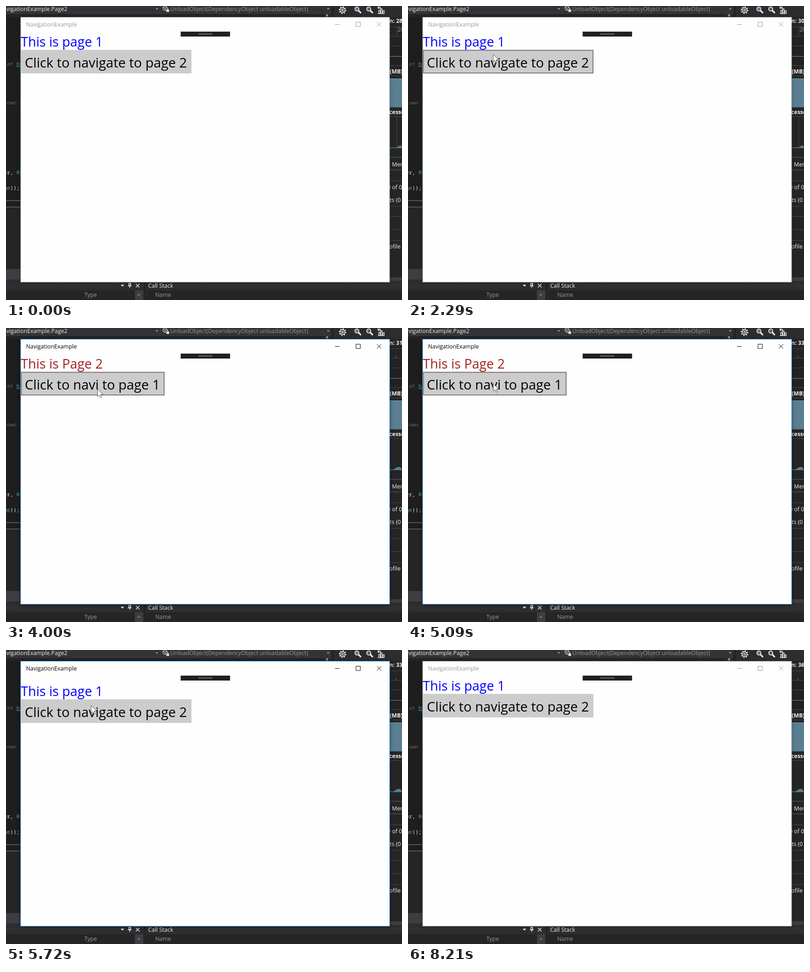
An HTML page for the animation above (8280 ms loop, 869 by 645 pixels).

```html
<!DOCTYPE html>
<html lang="en">
<head>
<meta charset="utf-8">
<title>Page navigation</title>
<style>
  html, body { margin: 0; width: 100%; height: 100%; overflow: hidden; background: #2d2d30; }
  svg { display: block; width: 869px; height: 645px; }
  text { font: 12.4px "Open Sans", "Noto Sans", sans-serif; fill: #f1f1f1; white-space: pre; }
  .bold { font-weight: 700; }
  .dim { fill: #999; }
  .code text { font: 11.67px "Noto Sans Mono", "DejaVu Sans Mono", monospace; fill: #dcdcdc; }
  .code .note { fill: #626c48; }
  .code .link { fill: #3f9cd6; text-decoration: underline; }
  .code .type { fill: #4aa5b8; }
  .line { fill: none; stroke: #f1f1f1; }
  .rule { fill: none; stroke: #3f3f46; }
  #win { --edge: #78877a; --ink: #999; --glow: .2; filter: drop-shadow(0 1px 4px rgba(0, 0, 0, var(--glow))); }
  #win.active { --edge: #1a8fe3; --ink: #000; --glow: .45; }
  #frame { fill: #fefefe; stroke: var(--edge); }
  #title { fill: var(--ink); }
  #caption { fill: none; stroke: var(--ink); }
  #head { font-size: 28.8px; fill: #00f; }
  #label { font-size: 29.3px; fill: #000; }
  .second #head { fill: #a52020; }
  #btn { fill: #ccc; }
  #ring { fill: none; stroke: #7a7a7a; stroke-width: 2; visibility: hidden; }
  .hover #ring { visibility: inherit; }
  .press #btn { fill: #999; }
</style>
</head>
<body>
<svg viewBox="0 0 869 645">
  <defs>
    <pattern id="dots" width="4" height="4" patternUnits="userSpaceOnUse">
      <path d="M0 0h1v1h-1zM2 2h1v1h-1z" fill="#46464a"/>
    </pattern>
  </defs>
  <rect width="869" height="645" fill="#2d2d30"/>

  <!-- editor -->
  <rect width="713" height="16" fill="#333337"/>
  <rect y="24" width="33" height="553" fill="#1e1e1e"/>
  <path d="M0 16.5H713M338.5 0V16M713.5 0V16" class="rule"/>
  <path d="M0 20.5H698" stroke="#252526" stroke-width="7"/>
  <rect y="577" width="33" height="23" fill="#3e3e42"/>
  <rect y="442" width="33" height="135" fill="#252526"/>
  <path d="M0 427H33M0 441H33" stroke="#55555a" stroke-width="2"/>
  <text x="134.5" y="10.5" text-anchor="end">NavigationExample.Page2</text>
  <text x="360.5" y="10.5" class="dim">UnloadObject(DependencyObject unloadableObject)</text>
  <path d="M328 5h6l-3 3zM704 5h6l-3 3z" fill="#aaa"/>
  <path d="M344.5 2.5l4.5-2.5 4.5 2.5v5l-4.5 2.5-4.5-2.5zl4.5 2.5 4.5-2.5M349 5v5" class="line"/>
  <path d="M352 8h6v5h-6z" fill="#ddd"/>
  <path d="M353.5 8v-1.5q1.5-2 3 0v1.5" class="line"/>
  <path d="M704.5 19v5M702 21l2.5-2.5 2.5 2.5" class="line"/>
  <g class="code">
    <text x="2" y="131" class="note">at</text>
    <text x="23" y="131" class="link">http</text>
    <text x="2" y="216" class="note">own c</text>
    <text x="-5" y="369">er, <tspan class="type">Ro</tspan></text>
    <text x="-5" y="403"><tspan class="type">ge</tspan>));</text>
  </g>

  <!-- toolbar -->
  <path d="M716.5 0V24" stroke="#252526" stroke-width="6"/>
  <g class="line">
    <circle cx="738.5" cy="9" r="5.2" stroke-width="1.4"/>
    <circle cx="738.5" cy="9" r="7" stroke-width="2.4" stroke-dasharray="2.5 3"/>
    <circle cx="738.5" cy="9" r="2" stroke-width="1.3"/>
    <circle cx="770" cy="6.5" r="4.3" stroke-width="1.9"/>
    <circle cx="796" cy="6.5" r="4.3" stroke-width="1.9"/>
    <path d="M773.5 10l5.5 5.5M799.5 10l5.5 5.5" stroke-width="3.2"/>
    <path d="M767.5 6.5h5M770 4v5M793.5 6.5h5" stroke="#6cb8f0" stroke-width="1.5"/>
    <path d="M818 16.5v-7h3v7zM822.5 16.5v-10h3v10zM827 16.5v-6h3v6zM816 16.5h14.5" stroke-width="1.3"/>
    <path d="M816 4.5q3-4 6-1v4M816.5 1v4h4" stroke-width="1.5"/>
  </g>

  <!-- diagnostics -->
  <rect x="842" y="24" width="27" height="582" fill="#252526"/>
  <rect x="842" y="67" width="27" height="63" fill="#222225"/>
  <path d="M842 45.5h27M842 66.5h27M842 87.5h27M842 130.5h27M842 153.5h27M842 242.5h27M842 383.5h27M842 439.5h27M842 461.5h27M842 490.5h27M842 514.5h27" stroke="#4a4a50"/>
  <path d="M842 110.5h27" stroke="#8d8d92"/>
  <path d="M842 332h27M842 359.5h27" stroke="#46464b" stroke-width="2"/>
  <rect x="842" y="160" width="27" height="62" fill="#5a7e92"/>
  <path d="M842 159.5h27" stroke="#79a5bc"/>
  <path d="M842 222.5h27" class="rule"/>
  <rect x="842" y="595" width="27" height="8" fill="#3e3e42"/>
  <text id="secs" x="841" y="37" class="bold"></text>
  <g id="early">
    <path d="M857.5 46v20M857.5 243v67" stroke="#48484d"/>
    <text x="859" y="56" class="dim">20s</text>
  </g>
  <path id="tick" d="M855.5 61v5" stroke="#66666b"/>
  <path id="cpu" fill="#5a7e92"/>
  <path d="M842 311h27" stroke="#5a7e92" stroke-width="1.5"/>
  <text x="842" y="147.5" class="bold">(MB)</text>
  <text x="841" y="236.5" class="bold">cessors</text>
  <text x="847" y="352">Memory</text>
  <text x="837" y="401.5">0 of 0</text>
  <text x="842" y="430">ts (0</text>
  <text x="841" y="532">ofile</text>

  <!-- bottom panels -->
  <rect y="603" width="869" height="21" fill="#2d2d30"/>
  <rect y="609" width="248" height="9" fill="url(#dots)"/>
  <rect x="371" y="609" width="498" height="9" fill="url(#dots)"/>
  <rect y="624" width="283" height="21" fill="#252526"/>
  <rect x="308" y="624" width="561" height="21" fill="#252526"/>
  <rect x="283" y="624" width="18" height="21" fill="#3e3e42"/>
  <path d="M304.5 606V645" stroke="#252526" stroke-width="5"/>
  <path d="M287.5 635.5h8l-4-5z" fill="#6b6b70"/>
  <path d="M251.5 611.5h8l-4 4z" fill="#f1f1f1"/>
  <path d="M269.5 608.5h4v5h-4zM273 609v4M267.5 614h8M271.5 614v4.5M285 609.5l8 8M293 609.5l-8 8" class="line" stroke-width="1.4"/>
  <text x="312" y="618">Call Stack</text>
  <text x="172" y="637.5" class="dim">Type</text>
  <text x="327.5" y="637.5" class="dim">Name</text>

  <!-- app window -->
  <g id="win">
    <rect id="frame" x="32" y="24.5" width="810" height="581.5"/>
    <text id="title" x="44" y="44.5">NavigationExample</text>
    <path id="caption" d="M722 40.5h10M768 35.5h9.5v9.5h-9.5zM814 35.5l9.5 9.5M823.5 35.5l-9.5 9.5"/>
  </g>
  <g id="page">
    <text id="head" x="32.6" y="89"></text>
    <rect id="btn" x="32.6" y="96.2" height="51.8"/>
    <rect id="ring" x="33.6" y="97.2" height="49.8"/>
    <text id="label" x="41.3" y="135"></text>
  </g>
  <rect x="383.3" y="56.2" width="108.4" height="10.8" fill="#1f1f1f"/>
  <path d="M422 60.5h31M422 62.5h31" stroke="#77777a"/>
  <path id="cursor" d="M0 0V16.500L3.800 13L6.400 18.800L9 17.700L6.400 12H11.600Z" fill="#fff" stroke="#444" stroke-width=".9"/>
</svg>

<script>
const LOOP = 8280;
const $ = id => document.getElementById(id);
const set = (id, attrs) => { for (const k in attrs) $(id).setAttribute(k, attrs[k]); };

const pages = [
  null,
  { head: "This is page 1", label: "Click to navigate to page 2", width: 374.4 },
  { head: "This is Page 2", label: "Click to navi to page 1", width: 315.4 }
];

// time, page (0 = blank), slide offset, button state
const states = [
  [0, 1, 0, ""], [1910, 1, 0, "hover"], [2760, 1, 0, "press"], [2840, 1, 0, "hover"],
  [2910, 0, 0, ""], ...slide(2990, 2, 76), [3680, 2, 0, "hover"],
  [3840, 2, 0, "press"], [3920, 2, 0, "hover"],
  ...slide(4070, 1, 68), [4380, 1, 0, "press"], [4540, 1, 0, "hover"],
  [4610, 0, 0, ""], ...slide(4690, 2, 68), [5010, 2, 0, "hover"],
  [5250, 2, 0, "press"], [5480, 2, 0, "hover"],
  [5560, 0, 0, ""], ...slide(5640, 1, 49), [7100, 1, 0, "hover"], [7180, 1, 0, ""]
];

// start, steps, step length, from, to
const moves = [
  [340, 9, 80, [722, 650], [405, 414]],
  [1450, 8, 77, [405, 414], [187, 105]],
  [2290, 3, 80, [187, 105], [187, 110]],
  [3680, 4, 80, [187, 110], [201, 134]],
  [4380, 4, 80, [201, 134], [187, 122]],
  [7100, 4, 83, [187, 122], [707, 595]]
];

const ticks = [0, 900, 1840, 3140, 4230, 4850, 5790, 6870, 7980];

// the entering page keeps a quarter of its offset at each step
function slide(start, page, offset) {
  return [0, 1, 2, 3].map(i =>
    [start + i * 75, page, i < 3 ? Math.floor(offset / 4 ** i) : 0, ""]);
}

function lastBefore(list, t) {
  return list.filter(item => item[0] <= t).pop();
}

function cursorAt(t) {
  const move = lastBefore(moves, t);
  if (!move || t >= 7430) return null;
  const [start, steps, len, from, to] = move;
  const p = Math.min(steps, Math.floor((t - start) / len) + 1) / steps;
  const e = p * p * (3 - 2 * p);
  return from.map((v, i) => Math.round(v + (to[i] - v) * e));
}

function render(t) {
  const [, index, offset, state] = lastBefore(states, t);
  const page = pages[index];
  set("page", {
    class: (index === 2 ? "second " : "") + state,
    transform: `translate(0 ${offset})`,
    visibility: page ? "visible" : "hidden"
  });
  if (page) {
    $("head").textContent = page.head;
    $("label").textContent = page.label;
    set("btn", { width: page.width });
    set("ring", { width: page.width - 2 });
  }

  set("win", { class: t >= 2760 && t < 8210 ? "active" : "" });
  $("secs").textContent = `n: ${27 + ticks.filter(s => s <= t).length} seconds`;

  const early = t < 2450;
  set("early", { visibility: early ? "visible" : "hidden" });
  set("tick", { visibility: early ? "hidden" : "visible" });
  set("cpu", { d: early ? "M857 311l5-4 4-1 3 3v2z" : "M850 311l4-3 5-3h6l2 3 1 3z" });

  const at = cursorAt(t);
  set("cursor", { visibility: at ? "visible" : "hidden" });
  if (at) set("cursor", { transform: `translate(${at})` });
}

const begin = performance.now();
function tick(now) {
  render(Math.max(0, now - begin) % LOOP);
  requestAnimationFrame(tick);
}
render(0);
requestAnimationFrame(tick);
</script>
</body>
</html>
```
